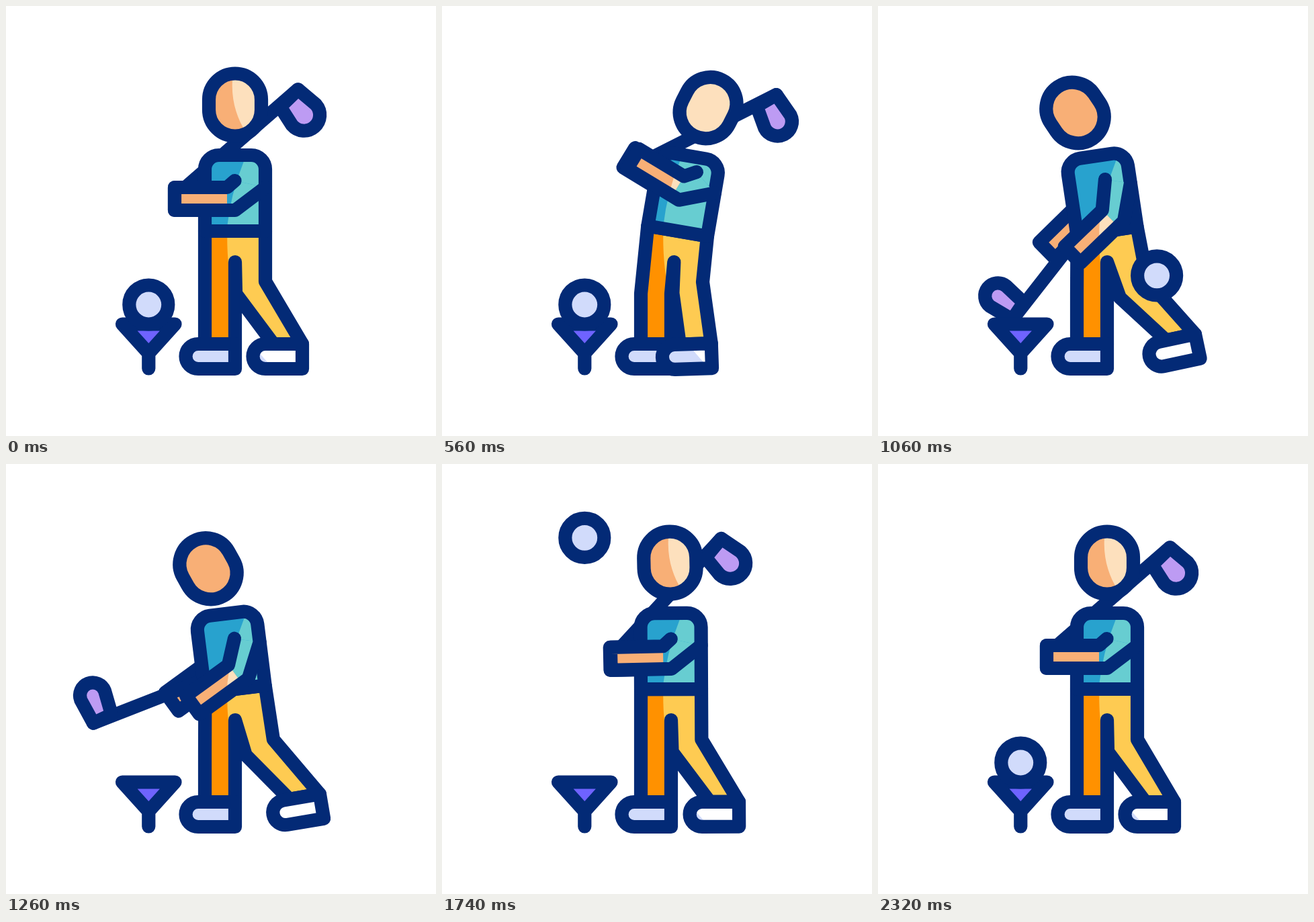
Animation of 640x640 px, one loop 2.4 s. Source, as an HTML page with a canvas:

```html
<!DOCTYPE html>
<html lang="en">
<head>
<meta charset="utf-8">
<title>Golf swing</title>
<style>
  html, body { margin: 0; width: 100%; height: 100%; overflow: hidden; background: #fff; }
  canvas { display: block; width: 100vw; height: 100vh; }
</style>
</head>
<body>
<canvas id="stage" width="640" height="640"></canvas>
<script>
const ctx = document.getElementById('stage').getContext('2d');
const LOOP = 2400, STEP = 20;
const INK = '#032a76';
const SKIN = ['#f8af76', '#fde0bd'];
const SHIRT = ['#28a2ce', '#67cdd1'];
const PANTS = ['#ff9100', '#fecb52'];
const SHOE = ['#d1dbfb', '#ffffff'];

// Everything right of this fixed curve is lit.
const LIT = new Path2D('M340 90C331 130 342 164 356 186C364 205 358 222 354 231' +
  'Q335 278 329.500 326C327 400 340 450 363 497Q372 512 392 533V640H640V90Z');

const TORSO = new Path2D('M-45 0V-92a21 21 0 0 1 21-21H24a21 21 0 0 1 21 21V0Z');
const HEAD = new Path2D('M-39-7.500a39 39 0 0 1 78 0v15a39 39 0 0 1-78 0z');
const FOOT = new Path2D('M0-18.500H55V18.500H0a18.500 18.500 0 0 1 0-37z');
const TEE = new Path2D('M173 473.500H251.500L212.300 517ZM212.300 517V539.500');

// Each channel: address, late backswing, downswing, impact, recovery.
const POSES = {
  hipX:   [341, 351, 345.5, 341, 341],
  lean:   [0, 11.5, 0.3, -8.5, -4],
  headX:  [341, 407, 342, 293.5, 318],
  headY:  [147, 156.5, 147.5, 159, 150.5],
  nod:    [0, 35, -6, -34, -17],
  sleeveX: [340.5, 381, 357, 338, 342],
  sleeveY: [260, 246, 254, 258, 261.5],
  elbowX: [341, 355, 352, 366, 350.7],
  elbowY: [304, 281, 310, 320, 315.3],
  bend:   [0, 40, -7.6, -44, -19.5],
  backX:  [341, 355, 330, 328, 334],
  backY:  [304, 281, 305, 313, 314],
  backBend: [0, 40, -7.6, -44.4, -19],
  gripX:  [252, 299, 295, 323, 284.7],
  gripY:  [283, 205, 298, 309, 313],
  club:   [41, -9.3, 134, 232, 132.6],
  reach:  [242, 242, 200, 200, 200],
  face:   [23.5, 23, 19.5, 19.3, 20],
  toeX:   [386, 338, 386.5, 422, 402.5],
  toeY:   [521.5, 521.5, 522, 518, 520],
  tilt:   [0, 0, -7, -12, -5],
  ankle:  [12, 13, 4, 11, 8],
  kneeX:  [386, 386, 394, 401, 392],
  kneeY:  [410, 410, 411, 409, 411],
  innerX: [342, 341, 351, 360, 350],
  innerY: [428, 427, 430, 434, 431]
};

const ease = (t, from, to) => {
  const u = Math.min(1, Math.max(0, (t - from) / (to - from)));
  return u * u * (3 - 2 * u);
};
const back = t => ease(t, 0, 400);
const down = t => ease(t, 400, 1000);
const rise = t => ease(t, 1060, 1820);
const BACK = back(300), DOWN = down(740), RISE = rise(1460);

// Parabola through a at 0, b at m and c at 1.
const bow = (p, m, a, b, c) =>
  a * (p - m) * (p - 1) / m + b * p * (p - 1) / (m * (m - 1)) + c * p * (p - m) / (1 - m);

function poseAt(t) {
  const pose = {};
  for (const key in POSES) {
    const [start, late, mid, hit, end] = POSES[key];
    const top = start + (late - start) / BACK;
    pose[key] = t < 400 ? start + (top - start) * back(t)
      : t < 1060 ? bow(down(t), DOWN, top, mid, hit)
      : bow(rise(t), RISE, hit, end, start);
  }
  return pose;
}

// Returns a function mapping local points to the stage.
function frame(x, y, deg) {
  const a = deg * Math.PI / 180, c = Math.cos(a), s = Math.sin(a);
  return (u, v) => [x + u * c - v * s, y + u * s + v * c];
}

function place(path, x, y, deg) {
  const out = new Path2D();
  out.addPath(path, new DOMMatrix().translate(x, y).rotate(deg));
  return out;
}

function poly(points, closed = true) {
  const path = new Path2D();
  points.forEach(p => path.lineTo(...p));
  if (closed) path.closePath();
  return path;
}

function paint(path, [shade, light]) {
  ctx.fillStyle = shade;
  ctx.fill(path);
  ctx.save();
  ctx.clip(path);
  ctx.fillStyle = light;
  ctx.fill(LIT);
  ctx.restore();
}

function part(path, colors) {
  paint(path, colors);
  ctx.stroke(path);
}

function drawBackArm(p) {
  const at = frame(p.backX, p.backY, p.backBend);
  part(poly([at(0, 0), at(-90, 0), at(-90, -34), at(0, -34)]), SKIN);
}

function drawClub(p) {
  const r = p.face, x = 3 - 0.9 * r, y = 34.6 + (23.5 - r) * 0.9;
  ctx.save();
  ctx.translate(p.gripX, p.gripY);
  ctx.rotate(-p.club * Math.PI / 180);
  ctx.translate(p.reach, 0);
  ctx.beginPath();
  ctx.moveTo(-p.reach, 0);
  ctx.lineTo(0, 0);
  ctx.stroke();
  ctx.beginPath();
  ctx.moveTo(-1.57 * r, 2);
  ctx.arc(x, y, r, Math.PI, 0, true);
  ctx.lineTo(0, 0);
  ctx.closePath();
  ctx.fillStyle = '#bd9bf3';
  ctx.fill();
  ctx.stroke();
  ctx.restore();
}

function drawLegs(p) {
  const hip = frame(p.hipX, 335, p.lean);
  const foot = frame(p.toeX, p.toeY, p.tilt);
  part(poly([
    hip(-45, 0), [296, 428], [296, 503], [341, 503], [341, 428],
    [341 + (p.hipX - 341) * 0.45, 381], [p.innerX, p.innerY],
    foot(p.ankle, -18.5), foot(55, -18.5), [p.kneeX, p.kneeY], hip(45, 0)
  ]), PANTS);
  part(place(FOOT, 286, 521.5, 0), SHOE);
  part(place(FOOT, p.toeX, p.toeY, p.tilt), SHOE);
}

function drawFrontArm(p) {
  const at = frame(p.elbowX, p.elbowY, p.bend);
  const elbow = at(0, 0), palm = at(-90, 0), wrist = at(-90, -34), crook = at(-12, -34);
  const sleeve = [p.sleeveX, p.sleeveY];
  const side = frame(p.hipX, 335, p.lean)(45, -65);
  paint(poly([crook, sleeve, side, elbow, at(-12, 0)]), SHIRT);
  paint(poly([wrist, crook, at(-12, 0), palm]), SKIN);
  ctx.stroke(poly([sleeve, crook, wrist, palm, elbow, side], false));
}

function ballAt(t) {
  const x = 212.3, rest = 444.5;
  if (t < 1000) return [x, rest];
  if (t < 1630) return [x + 3.38 * (t - 1000), rest - 0.72 * (t - 1000)];
  if (t < 1930) return [x, -40 + 484.5 * Math.pow((t - 1630) / 300, 1.17)];
  const u = Math.min(1, (t - 1930) / 390);
  return [x, rest - 63 * 4 * u * (1 - u)];
}

function drawBall(t) {
  ctx.beginPath();
  ctx.arc(...ballAt(t), 29, 0, Math.PI * 2);
  ctx.fillStyle = SHOE[0];
  ctx.fill();
  ctx.stroke();
}

function draw(now) {
  const t = Math.floor(now % LOOP / STEP) * STEP;
  const p = poseAt(t);
  ctx.fillStyle = '#fff';
  ctx.fillRect(0, 0, 640, 640);
  ctx.strokeStyle = INK;
  ctx.lineWidth = 20.2;
  ctx.lineCap = ctx.lineJoin = 'round';

  drawBackArm(p);
  drawClub(p);
  drawLegs(p);
  part(place(TORSO, p.hipX, 335, p.lean), SHIRT);
  part(place(HEAD, p.headX, p.headY, p.nod), SKIN);
  drawFrontArm(p);
  ctx.fillStyle = '#6f63ff';
  ctx.fill(TEE);
  ctx.stroke(TEE);
  drawBall(t);
}

const begin = performance.now();
function tick() {
  draw(performance.now() - begin);
  requestAnimationFrame(tick);
}
tick();
</script>
</body>
</html>
```
